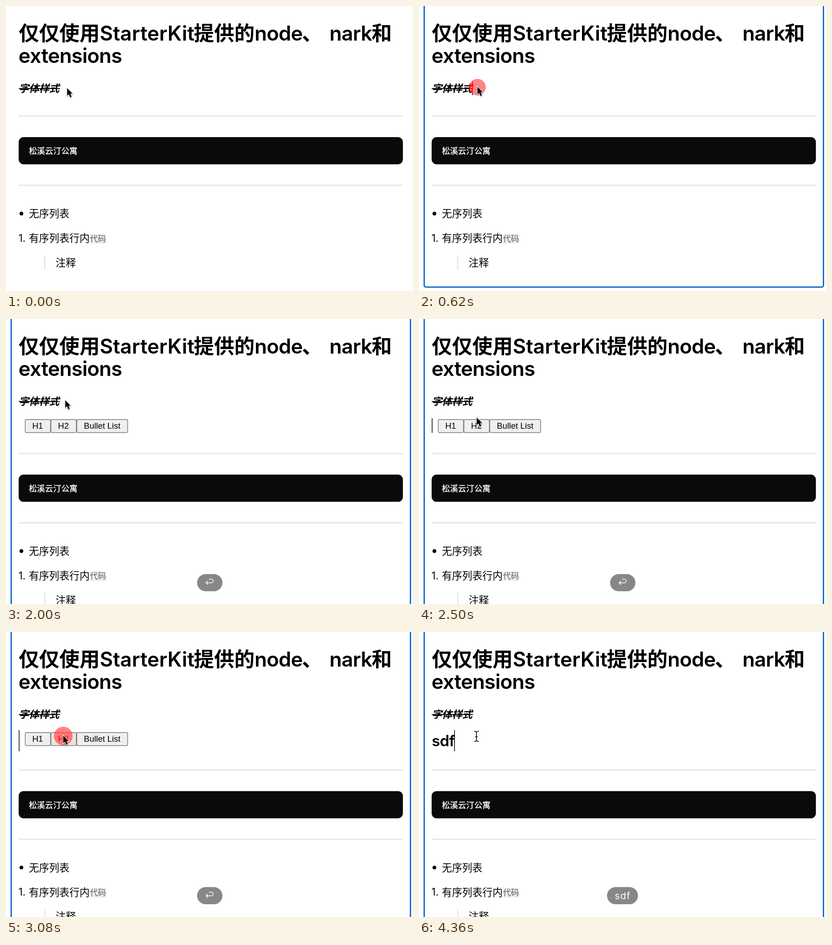
These frames come from a looping animation (894x626 px, 5.72 s). An HTML page:

```html
<!DOCTYPE html>
<html lang="zh-CN">
<head>
<meta charset="utf-8">
<title>Editor demo</title>
<style>
html, body { margin: 0; width: 100%; height: 100%; overflow: hidden; background: #fff; }
svg { display: block; width: 894px; height: 626px; }
text { font: 22.25px Inter, "Noto Sans CJK SC", "Noto Sans CJK", sans-serif; fill: #000; }
.zh { font-family: "Noto Sans CJK SC", "Noto Sans CJK", sans-serif; }
.h1 { font-size: 44.5px; font-weight: 600; }
.h2 { font-size: 33.4px; font-weight: 600; }
.h1, .h2 { letter-spacing: -.018em; }
.h1.zh, .h1.wide { letter-spacing: 0; }
.styled { font-weight: 700; font-style: italic; }
.code { font-size: 17.8px; }
#block { fill: #fff; stroke: #fff; stroke-width: .35; }
.btn rect { fill: #efefef; stroke: #767676; stroke-width: 1.4; }
.btn text { font: 18.55px "Liberation Sans", Arial, sans-serif; text-anchor: middle; }
.pill rect { fill: #878787; }
.pill text { font-size: 20.5px; fill: #fff; letter-spacing: 1.2px; text-anchor: middle; }
.rule { fill: #e7e7e7; }
#dotMul { fill: #ff8484; mix-blend-mode: multiply; }
#dotRed { fill: #f00; mix-blend-mode: screen; }
#arrow { filter: drop-shadow(0 1.5px 1.5px rgba(0,0,0,.35)); }
</style>
</head>
<body>
<svg viewBox="0 0 894 626">
  <rect width="894" height="626" fill="#fff"/>
  <g transform="translate(0 -1.2)">
    <text class="h1 zh" x="28" y="77.5">仅仅使用</text>
    <text class="h1 wide" x="206" y="77.5">StarterKit</text>
    <text class="h1 zh" x="412.6" y="77.5">提供的</text>
    <text class="h1" x="546" y="77.5">node</text>
    <text class="h1 zh" x="650" y="77.5">、</text>
    <text class="h1" x="710.5" y="77.5">nark</text>
    <text class="h1 zh" x="803" y="77.5">和</text>
    <text class="h1" x="27.6" y="126.5">extensions</text>
  </g>
  <text class="zh styled" x="28" y="188.8">字体样式</text>
  <rect x="28" y="180.3" width="90.5" height="2"/>

  <g id="rest">
    <rect class="rule" x="27.8" y="240.4" width="844" height="2.8"/>
    <rect x="27.8" y="288" width="844" height="59.8" rx="11" fill="#0a0a0a"/>
    <text id="block" class="zh code" x="50.3" y="325.2">松溪云汀公寓</text>
    <rect class="rule" x="27.8" y="392.4" width="844" height="2.8"/>
    <circle cx="33.8" cy="456" r="4.2"/>
    <text class="zh" x="50.3" y="464.3">无序列表</text>
    <text x="27.5" y="517.8">1.</text>
    <text class="zh" x="50.3" y="518.3">有序列表行内</text>
    <rect x="184" y="500.5" width="36" height="21.5" fill="#efefef"/>
    <text class="zh code" x="184.2" y="517.6" style="fill:#616161">代码</text>
    <rect class="rule" x="83.6" y="547" width="2.9" height="32"/>
    <text class="zh" x="109" y="571.8">注释</text>
  </g>

  <text id="typed" class="h2" x="28" y="251"></text>
  <g id="menu">
    <g class="btn"><rect x="42.2" y="220.7" width="55.6" height="28.8" rx="3"/><text x="69.5" y="241.2">H1</text></g>
    <g class="btn"><rect id="h2Btn" x="98.7" y="220.7" width="55.8" height="28.8" rx="3"/><text x="126.2" y="241.2">H2</text></g>
    <g class="btn"><rect x="155.5" y="220.7" width="111.8" height="28.8" rx="3"/><text x="211.2" y="241.2">Bullet List</text></g>
  </g>
  <rect id="caret" width="1.5"/>
  <rect id="focus" x="11.4" y="-20" width="877" rx="4" fill="none" stroke="#0563d1" stroke-width="2.8"/>

  <g id="enterPill" class="pill">
    <rect x="419.8" y="560.3" width="55.6" height="37.8" rx="18.9"/>
    <path d="M446 571.6H451.2a4 4 0 0 1 0 8H439.6M443.6 575.4l-4.2 4.2 4.2 4.2" fill="none" stroke="#fff" stroke-width="1.5"/>
  </g>
  <g id="keyPill" class="pill">
    <rect id="keyBox" y="560.3" height="37.8" rx="18.9"/>
    <text id="keyText" x="447.4" y="586.6"></text>
  </g>

  <circle id="dotMul"/>
  <circle id="dotRed"/>
  <path id="arrow" d="M0 0V16.6L3.8 13.1 6.7 20.2 9.9 18.8 7 12H12Z" fill="#000" stroke="#fff" stroke-width="2.2" paint-order="stroke"/>
  <g id="beam" fill="none" stroke-linecap="round">
    <path d="M-4.5-11.3Q-.4-11.3 0-8V8Q-.4 11.3-4.5 11.3M4.5-11.3Q.4-11.3 0-8M0 8Q.4 11.3 4.5 11.3M-2.4 1H2.4" stroke="#fff" stroke-width="3.2"/>
    <path d="M-4.5-11.3Q-.4-11.3 0-8V8Q-.4 11.3-4.5 11.3M4.5-11.3Q.4-11.3 0-8M0 8Q.4 11.3 4.5 11.3M-2.4 1H2.4" stroke="#000" stroke-width="1.5"/>
  </g>
</svg>
<script>
const LOOP = 5720, STEP = 20;
const FOCUS = 400, ENTER = 1540, ENTER_PILL = 1600, PRESS = 2880, RELEASE = 3000;
const KEYS = [3200, 3280, 3360], PILL_END = 3480;
const CLICKS = [[360, 660], [PRESS, 630]];
// time, x, y of the pointer tip
const PATH = [
  [80, 134.3, 180.6], [140, 131.3, 179.8], [360, 131.3, 179.8], [460, 128.4, 177.6],
  [640, 128.4, 177.6], [900, 130.2, 178.4], [2140, 130.2, 178.4], [2660, 125.8, 227.6]
];
const $ = id => document.getElementById(id);
const set = (id, attrs) => { for (const k in attrs) $(id).setAttribute(k, attrs[k]); };
const show = (id, on) => { $(id).style.display = on ? "" : "none"; };
const ease = u => u * u * (3 - 2 * u);

function pointer(t) {
  const i = PATH.findIndex(p => p[0] > t);
  if (i === 0) return PATH[0].slice(1);
  if (i < 0) return PATH[PATH.length - 1].slice(1);
  const a = PATH[i - 1], b = PATH[i], u = ease((t - a[0]) / (b[0] - a[0]));
  return [a[1] + (b[1] - a[1]) * u, a[2] + (b[2] - a[2]) * u];
}

function caretOn(t) {
  const since = [FOCUS, 1500, RELEASE, ...KEYS].filter(r => r <= t).pop();
  return (t - since) % 1000 < 500;
}

function draw(t) {
  const count = KEYS.filter(k => k <= t).length;
  const word = "sdf".slice(0, count);
  const split = t >= ENTER, heading = t >= RELEASE;
  const focused = t >= FOCUS && !(t >= PRESS && t < RELEASE);
  const shift = heading ? 61.4 : split ? 53.8 : 0;

  set("rest", { transform: `translate(0 ${shift})` });
  set("focus", { height: 637.4 + shift });
  show("focus", focused);
  $("typed").textContent = word;
  show("menu", split && !count);

  const caretX = count ? [0, 45, 65, 77.3][count] : split ? 28 : 116.6;
  const [top, tall] = heading ? [215.5, 46.5] : split ? [218, 32] : [164.7, 31.3];
  set("caret", { x: caretX, y: top, height: tall });
  show("caret", focused && caretOn(t));

  show("enterPill", t >= ENTER_PILL && t < PILL_END);
  set("enterPill", { transform: `translate(0 ${count ? -48.6 : 0})` });
  show("keyPill", count);
  const w = [0, 46, 59, 68][count];
  set("keyBox", { x: 447 - w / 2, width: w });
  $("keyText").textContent = word;

  const [x, y] = pointer(t);
  const over = y > 221 && x > 98;
  $("h2Btn").style.fill = t >= PRESS && !heading ? "#f5f5f5" : over ? "#e5e5e5" : "#efefef";

  const click = CLICKS.find(([s, d]) => t >= s && t < s + d);
  const r = click ? 30 * (1 - (t - click[0]) / click[1]) : 0;
  for (const id of ["dotMul", "dotRed"]) set(id, { cx: x, cy: y + .8, r });

  show("arrow", !count);
  show("beam", count);
  set("arrow", { transform: `translate(${x} ${y})` });
  set("beam", { transform: `translate(${x + .4} ${y + 1.6})` });
}

const start = performance.now();
function tick() {
  const t = (performance.now() - start) % LOOP;
  draw(Math.floor(t / STEP) * STEP);
  requestAnimationFrame(tick);
}
tick();
</script>
</body>
</html>
```
